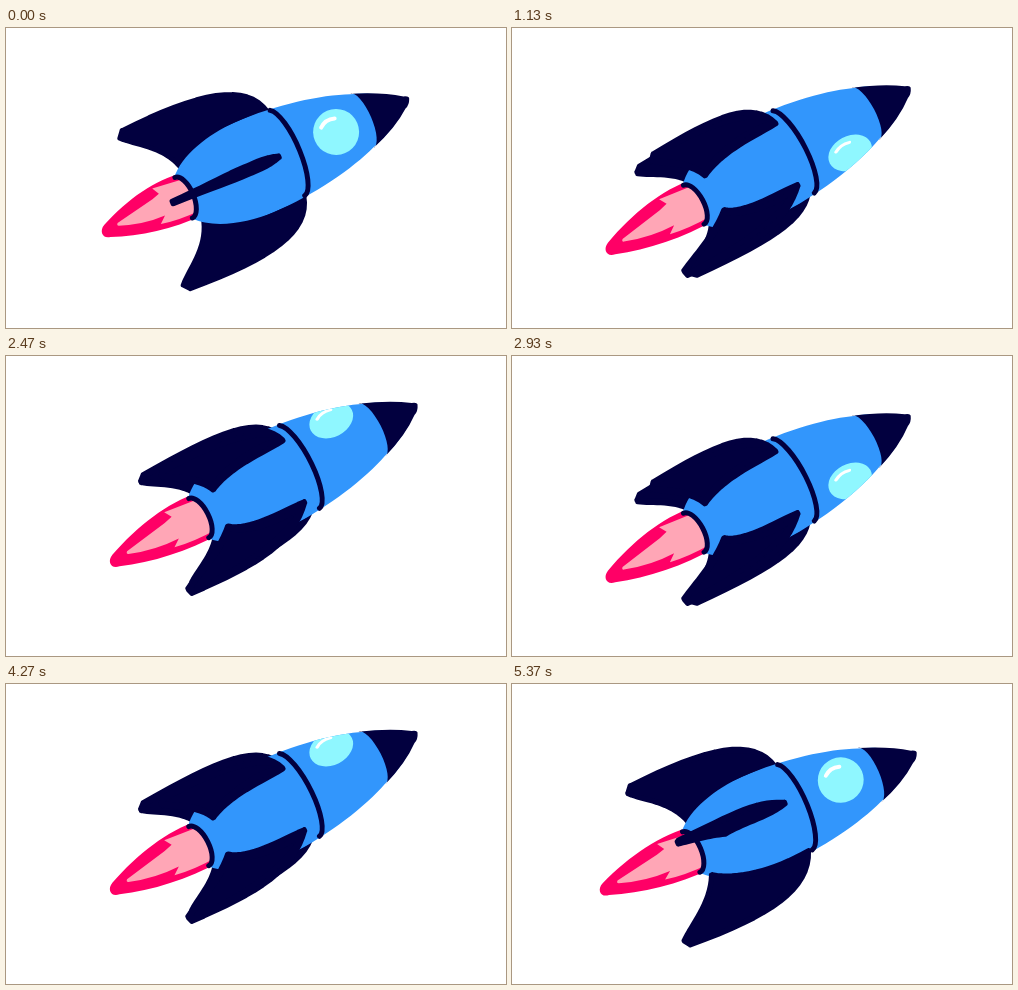
An HTML page for the animation above (5410 ms loop, 500 by 300 pixels).

```html
<!DOCTYPE html>
<html lang="en">
<head>
<meta charset="utf-8">
<title>Rocket</title>
<style>
  html, body { margin: 0; width: 100%; height: 100%; overflow: hidden; background: #fff; }
  svg { display: block; width: 100vw; height: 100vh; }
  .fins { fill: #02003f; stroke: #02003f; stroke-width: 5; stroke-linejoin: round; }
  .ring { fill: none; stroke: #02003f; stroke-width: 5; stroke-linecap: round; }
</style>
</head>
<body>
<svg viewBox="0 0 500 300">
  <defs>
    <clipPath id="hull">
      <path d="M-113-22C-97-40-65-48.5-35-49C10-49 55-40 82-29Q113-19 131 0Q113 19 82 29C55 40 10 49-35 49C-65 48.5-97 40-113 22A10 22 0 0 0-113-22Z"/>
    </clipPath>
  </defs>
  <!-- x runs along the rocket's axis, with the middle ring at 0 -->
  <g id="rocket">
    <path id="rear" class="fins"/>
    <g id="flame">
      <path fill="#ff0066" d="M10-23C-18-28-50-21-82-6.5C-89-3-89 6-81 7C-54 18-20 25 10 23Z"/>
      <path fill="#ffa6b6" d="M10-17L-24-21L-20-13.5L-28-11L-69-3Q-71-1-69 0Q-46 9-23 9L-30 15Q-12 19 10 18Z"/>
    </g>
    <g clip-path="url(#hull)">
      <rect x="-120" y="-55" width="260" height="110" fill="#3296fc"/>
      <g id="window">
        <circle r="23" fill="#8ff7ff"/>
        <path d="M-12-10Q-5-16 4-13" fill="none" stroke="#fff" stroke-width="4" stroke-linecap="round"/>
      </g>
    </g>
    <path fill="#02003f" d="M82-29.5Q111-19 130-6Q136-4 134-1Q132 4 127 6Q110 20 82 29.5A10 29.5 0 0 0 82-29.5Z"/>
    <path class="ring" d="M2-46A14 46.5 0 0 1 0 46"/>
    <path class="ring" d="M-112-22A10 22 0 0 1-112 22"/>
    <path id="front" class="fins"/>
  </g>
</svg>
<script>
const LOOP = 5410, FRAME = 100 / 3, LAST = 161, CYCLE = 27;
const TAU = Math.PI * 2, RAD = Math.PI / 180;
const el = id => document.getElementById(id);

// Fin outline as distance along the axis and distance from it.
const finCurves = [
  [[-1, 46], [-9, 81], [-55, 91], [-142, 86]],
  [[-147, 80], [-136, 68], [-111, 56], [-103, 30]],
  [[-102, 30], [-80, 44], [-40, 52], [-1, 46]]
];

function bezier([a, b, c, d], t) {
  const s = 1 - t;
  return [0, 1].map(i =>
    s * s * s * a[i] + 3 * s * s * t * b[i] + 3 * s * t * t * c[i] + t * t * t * d[i]);
}

const finOutline = finCurves.flatMap(curve =>
  Array.from({ length: 17 }, (_, i) => bezier(curve, i / 16)));

// Equal winding keeps overlapping pieces from cancelling out.
function polygon(points) {
  const area = points.reduce((sum, [x, y], i) => {
    const [nx, ny] = points[(i + 1) % points.length];
    return sum + x * ny - nx * y;
  }, 0);
  if (area < 0) points = [...points].reverse();
  return "M" + points.map(p => p.map(n => n.toFixed(2)).join(" ")).join("L") + "Z";
}

function finPath(angle) {
  const cos = Math.cos(angle), sin = Math.sin(angle), near = Math.max(0, cos);
  const sweep = near * (1 + 1.2 * sin);
  const side = sign => finOutline.map(([u, r]) => {
    const s = -u / 147;
    const thickness = 0.5 + 42 * s * Math.exp(-4 * s);
    const shift = -0.3 * u * near * near - sweep * (8 + 0.4 * (r - 47));
    return [u + shift, r * sin + sign * thickness * cos];
  });
  const a = side(1), b = side(-1);
  const strips = a.map((p, i) => {
    const j = (i + 1) % a.length;
    return polygon([p, a[j], b[j], b[i]]);
  });
  return polygon(a) + polygon(b) + strips.join("");
}

function draw(time) {
  const frame = Math.min(LAST, Math.floor((time % LOOP + 5) / FRAME));
  const wave = peak => Math.cos(TAU * (frame - peak) / CYCLE);

  const noseX = 405.5 + 6.7 * wave(19);
  const noseY = 57 - 16.3 * wave(15);
  const tilt = 27.2 + 3.9 * wave(13);
  const roll = 43 * RAD * wave(CYCLE / 4);

  el("rocket").setAttribute("transform",
    `translate(${noseX} ${noseY}) rotate(${-tilt}) translate(-134 0)`);

  const stretch = 1.09 - 0.08 * Math.cos(TAU * frame / 3);
  el("flame").setAttribute("transform", `translate(-113 0) scale(${stretch} 1)`);

  const cos = Math.cos(roll), sin = Math.sin(roll);
  el("window").setAttribute("transform",
    `translate(${41 + 13 * cos} ${40 * sin}) scale(1 ${cos})`);

  const fins = { rear: "", front: "" };
  for (let i = 0; i < 4; i++) {
    const angle = roll + i * TAU / 4;
    fins[Math.cos(angle) > 0.02 ? "front" : "rear"] += finPath(angle);
  }
  for (const layer in fins) el(layer).setAttribute("d", fins[layer]);
}

const start = performance.now();
function tick() {
  draw(performance.now() - start);
  requestAnimationFrame(tick);
}
tick();
</script>
</body>
</html>
```
